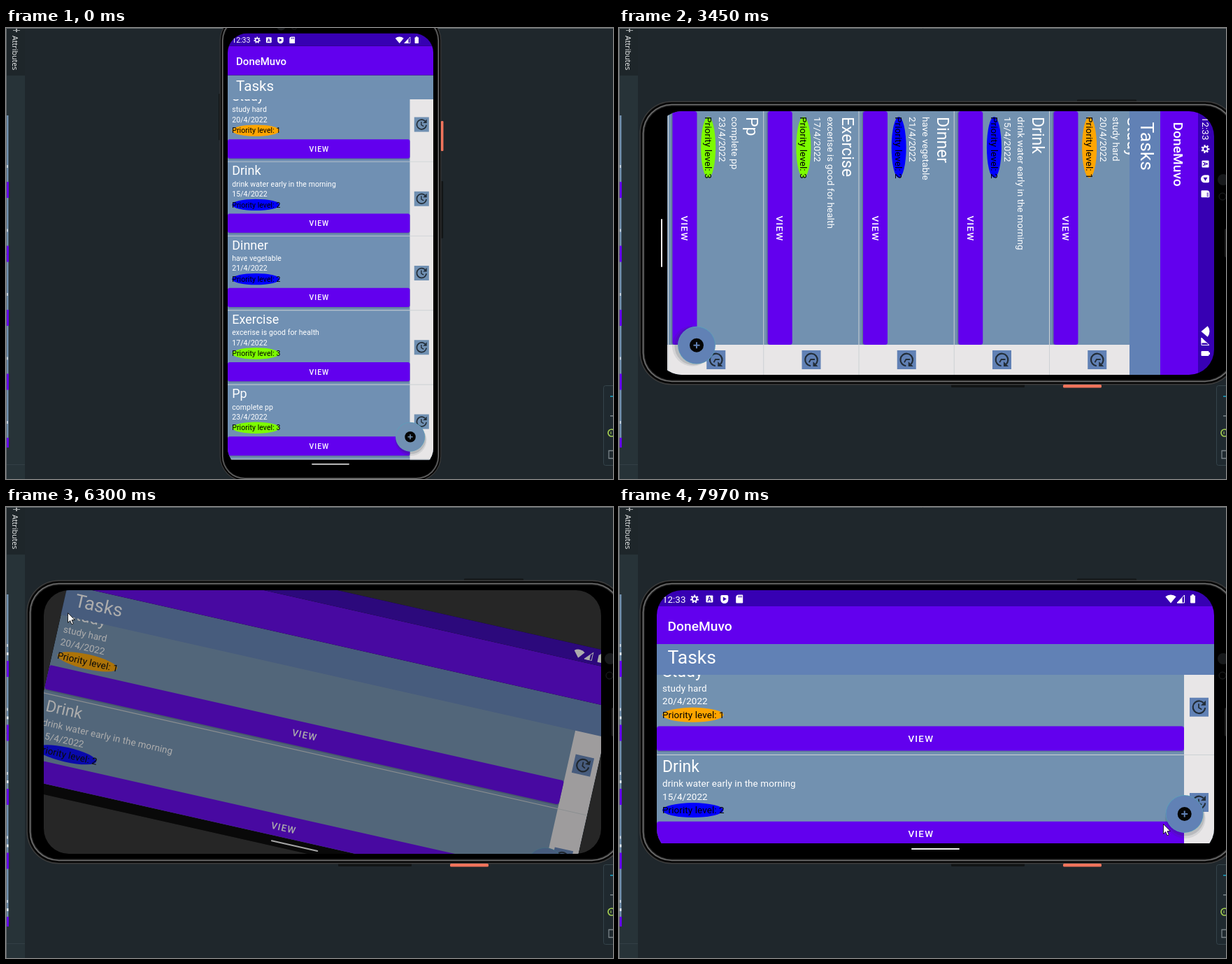
Animation, 868 px wide and 645 px high, one loop 8 s. Source, as an HTML page with a canvas:

```html
<!DOCTYPE html>
<html lang="en">
<head>
<meta charset="utf-8">
<title>Task list rotation</title>
<style>
html, body { margin: 0; width: 100%; height: 100%; overflow: hidden; background: #1f272c; }
canvas { display: block; }
</style>
</head>
<body>
<canvas id="stage" width="868" height="645"></canvas>
<script>
const ctx = document.getElementById('stage').getContext('2d');
const LOOP = 8000, SHORT = 377, LONG = 797, CORNER = 36, STRIP = 43;
const TURN_AT = 3450, HINT_AT = 4200, PRESS_AT = 5580, SPIN_AT = 6300, SETTLE_AT = 6430;
const ROW_TOP = 98.75, ROW_PITCH = 136.25;
const PURPLE = '#6200ee', DEEP = '#3700b3', WHITE = '#ffffff', INK = '#222d38';
const MUTED = { bar: '#7090b2', card: '#7090b3' };
const VIVID = { bar: '#6181b5', card: '#7291b0' };
const TAU = Math.PI * 2;
const dp = n => n * 0.96;

const levelTint = { 1: 'orange', 2: 'blue', 3: 'lawngreen' };
const tasks = [
  { name: 'Study', note: 'study hard', date: '20/4/2022', level: 1 },
  { name: 'Drink', note: 'drink water early in the morning', date: '15/4/2022', level: 2 },
  { name: 'Dinner', note: 'have vegetable', date: '21/4/2022', level: 2 },
  { name: 'Exercise', note: 'excerise is good for health', date: '17/4/2022', level: 3 },
  { name: 'Pp', note: 'complete pp', date: '23/4/2022', level: 3 }
];

// Two pointer visits; each stop is reached at its time after a glide in even steps.
const visits = [
  { from: 500, until: 2530, start: [250, 139], stops: [
    { at: 1020, glide: 520, to: [331, 378] },
    { at: 1820, glide: 430, to: [566, 567] },
    { at: 2380, glide: 145, to: [173, 46] }
  ] },
  { from: 3900, until: LOOP, start: [92, 32], stops: [
    { at: 4050, glide: 150, to: [79, 242] },
    { at: 4320, glide: 270, to: [260, 440] },
    { at: 4760, glide: 440, to: [48, 223] },
    { at: 5280, glide: 520, to: [88, 151] },
    { at: 6880, glide: 150, to: [411, 100] },
    { at: 7300, glide: 420, to: [778, 464] },
    { at: 7970, glide: 400, to: [778, 453] }
  ] }
];

function box(color, x, y, w, h, r = 0) {
  ctx.fillStyle = color;
  ctx.beginPath();
  ctx.roundRect(x, y, w, h, r);
  ctx.fill();
}

function frame(color, width, x, y, w, h, r = 0) {
  ctx.strokeStyle = color;
  ctx.lineWidth = width;
  ctx.beginPath();
  ctx.roundRect(x, y, w, h, r);
  ctx.stroke();
}

function oval(color, x, y, rx, ry = rx) {
  ctx.fillStyle = color;
  ctx.beginPath();
  ctx.ellipse(x, y, rx, ry, 0, 0, TAU);
  ctx.fill();
}

function arc(color, width, x, y, r, from = 0, to = TAU) {
  ctx.strokeStyle = color;
  ctx.lineWidth = width;
  ctx.beginPath();
  ctx.arc(x, y, r, from, to);
  ctx.stroke();
}

function shape(color, points) {
  ctx.fillStyle = color;
  ctx.beginPath();
  points.forEach(([x, y]) => ctx.lineTo(x, y));
  ctx.closePath();
  ctx.fill();
}

function line(color, width, points) {
  ctx.strokeStyle = color;
  ctx.lineWidth = width;
  ctx.beginPath();
  points.forEach(([x, y]) => ctx.lineTo(x, y));
  ctx.stroke();
}

function label(text, x, y, size, { color = WHITE, weight = 400, gap = 0, align = 'left', family = 'Roboto' } = {}) {
  ctx.font = `${weight} ${size}px "${family}", sans-serif`;
  ctx.letterSpacing = gap + 'px';
  ctx.textAlign = align;
  ctx.fillStyle = color;
  ctx.fillText(text, x, y);
}

function at(x, y, draw, angle = 0, scale = 1) {
  ctx.save();
  ctx.translate(x, y);
  ctx.rotate(angle);
  ctx.scale(scale, scale);
  draw();
  ctx.restore();
}

function clipTo(x, y, w, h, r = 0) {
  ctx.beginPath();
  ctx.roundRect(x, y, w, h, r);
  ctx.clip();
}

function workspace(t) {
  box('#1f272c', 0, 0, 868, 645);
  box('#273338', 1, 0, 26, 645);
  box('#1e262a', 1, 0, 26, 68);
  box('#333f45', 1, 624, 26, 1);
  at(9, 11, () => label('Attributes', 0, 0, 10.7, { color: '#f0f2f2', family: 'Open Sans' }), Math.PI / 2);
  box('#a3a8aa', 10, 3, 10, 1);
  box('#a3a8aa', 14, 1, 2, 5);

  // Sliver of the neighbouring preview, one band per task.
  box(VIVID.card, 1, 125, 2.5, 475);
  tasks.forEach((_, i) => {
    const y = 220 + i * 91.5;
    box(PURPLE, 1, y, 3, Math.min(23, 600 - y));
    box('#c3d0dc', 1, y - 24, 2, 4);
    if (t >= 4480) box('#e3e9ee', 1, y - 12, 2.5, 4);
  });

  box('#1f292f', 854.5, 511.5, 30, 114, 3);
  frame('#35444b', 1, 854.5, 511.5, 30, 114, 3);
  box('#17a2c4', 864, 526, 4, 1.5);
  box('#7b858a', 864, 554, 4, 1.5);
  arc('#a4cf4f', 1.7, 866, 579, 5);
  box('#a4cf4f', 864.5, 577, 1, 4);
  frame('#7b858a', 1.3, 862, 604.5, 11, 11);

  frame('#646a6d', 1, 0.5, 0.5, 900, 700);
}

function phone() {
  box('#121516', -16.5, 111, 4, 85, 1);
  box('#121516', 389, 271, 6, 105, 1);
  ['#3d3d3d', '#080808', '#080808', '#757575', '#303030', '#000000'].forEach((tone, i) => {
    const inset = i * 1.4;
    box(tone, inset - 14.5, inset - 33, 406 - 2 * inset, 854.5 - 2 * inset, 46 - inset);
  });
  box('#f0745c', 391, 161, 4.5, 55, 1.5);
  oval('#17191b', 98, -13, 8);
  arc('#202224', 1, 122, -12, 5);
  box('#1d1d1d', 168, -20, 41, 5, 2);
}

const statusIcons = [
  () => {
    ctx.setLineDash([2.2, 2.2]);
    arc(WHITE, 2, 0, 0, 5);
    ctx.setLineDash([]);
    arc(WHITE, 2, 0, 0, 3.3);
  },
  () => {
    box(WHITE, -5, -5, 10, 10, 1);
    label('A', 0, 3.2, 8.5, { color: DEEP, weight: 700, align: 'center' });
  },
  () => {
    box(WHITE, -5.5, -5.5, 11, 12, [2, 2, 6, 6]);
    shape(DEEP, [[-2, -3], [3, 0], [-2, 3]]);
  },
  () => {
    box(WHITE, -5, -6, 10, 12, [4, 1, 1, 1]);
    for (let x = -1.5; x < 4; x += 2) box(DEEP, x, -4.5, 1, 2.5);
  }
];

function statusBar(w) {
  box(DEEP, 0, 0, w, 23);
  label('12:33', 8, 17.5, dp(14));
  statusIcons.forEach((icon, i) => at(54 + i * 21.4, 12.5, icon));
  ctx.fillStyle = WHITE;
  ctx.beginPath();
  ctx.moveTo(w - 62, 18.5);
  ctx.arc(w - 62, 18.5, 12, TAU * 0.64, TAU * 0.86);
  ctx.fill();
  shape(WHITE, [[w - 53, 18.4], [w - 45.5, 18.4], [w - 45.5, 10]]);
  line(WHITE, 1, [[w - 53, 18], [w - 42.5, 18], [w - 42.5, 7], [w - 53, 18]]);
  box(WHITE, w - 34, 7.5, 7, 11, 1);
  box(WHITE, w - 32, 6, 3, 2);
}

function updateIcon(color) {
  box(color, -13.5, -13.5, 27, 27);
  arc(INK, 2.2, 0, 0, 8.8, 0.1, 5.5);
  shape(INK, [[9.5, -9.5], [9.5, -2.5], [2.5, -2.5]]);
  line(INK, 1.8, [[-0.5, -5], [-0.5, 0.8], [3.8, 3.3]]);
}

function taskRow({ name, note, date, level }, w, theme) {
  const cardW = w - STRIP, small = dp(14), gap = 0.09;
  label(name, 8, 25, dp(24));
  label(note, 8, 46, small, { gap });
  label(date, 8, 64.6, small, { gap });
  oval(levelTint[level], 51.7, 79.6, 43.7, 10.5);
  label('Priority level: ' + level, 8, 84.4, small, { color: '#000000', gap });
  box('rgba(20,30,50,.2)', 0, 97, cardW, 35.5, 4);
  box(PURPLE, 0, 95.75, cardW, 35, 3.5);
  label('VIEW', cardW / 2 + 0.8, 118.2, small, { weight: 500, gap: 1.2, align: 'center' });
  at(w - 21.5, 68.5, () => updateIcon(theme.bar));
}

function addButton(color) {
  oval('rgba(40,50,60,.10)', 1, 6, 29);
  oval('rgba(40,50,60,.16)', 1, 4, 27.5);
  oval('#55a3bd', 0, 0, 26.9);
  oval(color, 0, 0, 26.3);
  oval('#050505', 0, 0, 10);
  box(color, -4.5, -1, 9, 2);
  box(color, -1, -4.5, 2, 9);
}

function app(w, h, theme = VIVID) {
  box('#000000', 0, 0, w, h);
  at(0, 0, () => {
    clipTo(0, 120, w, h - 135);
    box(theme.card, 0, 0, w, h);
    box('#e8e6e7', w - STRIP, 0, STRIP, h);
    tasks.forEach((task, i) => at(0, ROW_TOP + i * ROW_PITCH, () => taskRow(task, w, theme)));
    tasks.forEach((_, i) => box('#ccd1d4', 0, ROW_TOP + (i + 1) * ROW_PITCH, w, 1));
    at(w - 42.3, h - 57, () => addButton(theme.bar));
  });
  box(theme.bar, 0, 77, w, 44);
  label('Tasks', 15.5, 105.3, 26.4);
  box(PURPLE, 0, 23, w, 54);
  label('DoneMuvo', 15.5, 58, dp(20), { weight: 500 });
  statusBar(w);
  box('#f2f2f2', w / 2 - 34.5, h - 8, 69, 2, 1);
}

function uprightPhone(theme) {
  at(317, 7.5, () => {
    phone();
    clipTo(0, 0, SHORT, LONG, CORNER);
    app(SHORT, LONG, theme);
  }, 0, 0.78);
}

function turnedPhone(t) {
  at(851, 119, () => {
    phone();
    if (t >= SPIN_AT) return;
    clipTo(0, 0, SHORT, LONG, CORNER);
    app(SHORT, LONG);
  }, Math.PI / 2);
  if (t < SPIN_AT) return;
  at(54, 119, () => {
    clipTo(0, 0, LONG, SHORT, CORNER);
    if (t >= SETTLE_AT) return app(LONG, SHORT);
    box('#262626', 0, 0, LONG, SHORT);
    at(LONG / 2, SHORT / 2, () => {
      ctx.translate(-LONG / 2, -SHORT / 2);
      app(LONG, SHORT);
      box('rgba(25,25,25,.36)', 0, 0, LONG, SHORT);
    }, 12.7 * TAU / 360);
  });
}

function rotateHint(t) {
  const swing = t < 4900 ? Math.sin((t - HINT_AT) / 110) * 0.6 : 0;
  oval(t < PRESS_AT ? '#2f2d31' : '#39363b', 92, 157.5, 19);
  at(92, 157, () => {
    frame('#f0f0f0', 1.5, -3.5, -5, 7, 10, 1);
    for (const side of [1, -1]) shape('#f0f0f0', [[2, -7], [6, -7], [6, -3]].map(([x, y]) => [x * side, y * side]));
  }, swing);
}

function pointerPlace(t) {
  const visit = visits.find(v => t >= v.from && t < v.until);
  return visit && visit.stops.reduce((place, { at, glide, to }) => {
    const steps = Math.round(glide / 140);
    const done = Math.floor((t - at + glide) / glide * steps) / steps;
    const progress = Math.min(1, Math.max(0, done));
    return place.map((value, axis) => value + (to[axis] - value) * progress);
  }, visit.start);
}

function pointer(t) {
  const place = pointerPlace(t);
  if (!place) return;
  at(place[0] + 0.5, place[1] + 0.5, () => {
    const arrow = [[0, 0], [0, 14], [3.2, 11], [5.5, 16.3], [7.8, 15.3], [5.5, 10.2], [9.8, 10]];
    ctx.lineJoin = 'round';
    shape(WHITE, arrow);
    line('#111111', 0.9, [...arrow, arrow[0]]);
  });
}

function render(t) {
  workspace(t);
  if (t < TURN_AT) {
    uprightPhone(MUTED);
    if (t >= 2380) at(0, 0, () => {
      clipTo(173, 46, 403, 539);
      uprightPhone(VIVID);
    });
  } else {
    turnedPhone(t);
    if (t >= HINT_AT && t < SPIN_AT) rotateHint(t);
  }
  pointer(t);
}

const start = performance.now();
function tick() {
  render((performance.now() - start) % LOOP);
  requestAnimationFrame(tick);
}
tick();
</script>
</body>
</html>
```
